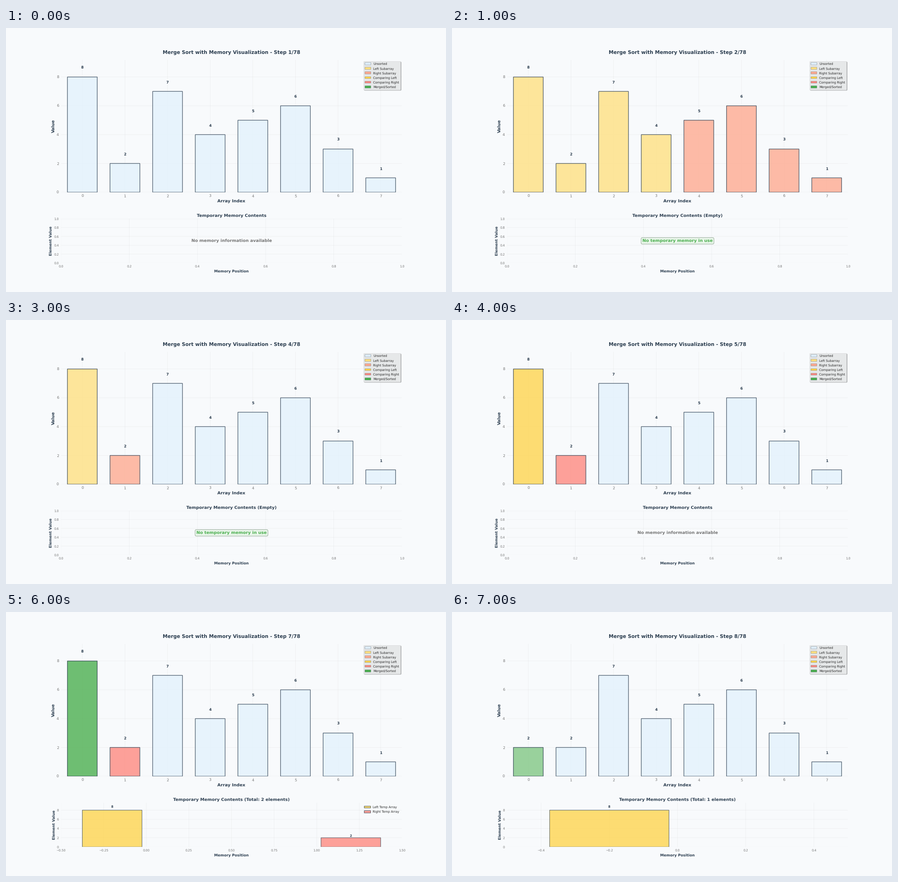
A matplotlib script for the animation above (8000 ms loop, 966 by 580 pixels).

```python
import matplotlib.pyplot as plt
from matplotlib.animation import FuncAnimation
from matplotlib.patches import Patch

DPI = 48.3
BG = "#F8FAFC"
INK = "#2C3E50"
GREY = "#757575"
GREEN = "#4CAF50"

PLAIN, LEFT, RIGHT = "#E3F2FD", "#FFE082", "#FFAB91"
CMP_LEFT, CMP_RIGHT = "#FFD54F", "#FF8A80"
PLACED = "#81C784"

KEY = [
    ("Unsorted", PLAIN),
    ("Left Subarray", LEFT),
    ("Right Subarray", RIGHT),
    ("Comparing Left", CMP_LEFT),
    ("Comparing Right", CMP_RIGHT),
    ("Merged/Sorted", GREEN),
]

START = [8, 2, 7, 4, 5, 6, 3, 1]
TOTAL_STEPS = 78

# Each step: leading bar colours, memory (None = unknown, else left and right lists)
STEPS = [
    ([], None),
    ([LEFT] * 4 + [RIGHT] * 4, ([], [])),
    ([LEFT] * 2 + [RIGHT] * 2, ([], [])),
    ([LEFT, RIGHT], ([], [])),
    ([CMP_LEFT, CMP_RIGHT], None),
    ([CMP_LEFT, CMP_RIGHT], ([8], [2])),
    ([GREEN, CMP_RIGHT], ([8], [2])),
    ([PLACED], ([8], [])),
]

plt.rcParams.update({
    "font.family": "DejaVu Sans",
    "text.hinting": "none",
    "text.color": "#262626",
    "axes.facecolor": BG,
    "axes.axisbelow": True,
})

fig, (top, low) = plt.subplots(
    2, 1, figsize=(966.001 / DPI, 580.001 / DPI), dpi=DPI, facecolor=BG,
    gridspec_kw={"height_ratios": [3, 1], "hspace": 0.3})


def style(ax, title, xlabel, ylabel, title_size, pad, label_size, tick_size):
    bold = {"fontweight": "bold", "color": INK}
    ax.set_title(title, fontsize=title_size, pad=pad, **bold)
    ax.set_xlabel(xlabel, fontsize=label_size, **bold)
    ax.set_ylabel(ylabel, fontsize=label_size, **bold)
    ax.tick_params(length=0, pad=7, labelsize=tick_size, labelcolor=GREY)
    ax.grid(True, color="0.8", linewidth=1, alpha=0.3, snap=False)
    ax.spines[:].set_visible(False)


def draw_bars(ax, xs, heights, colors, width, line, label_y, size):
    ax.bar(xs, heights, width, color=colors, edgecolor=INK,
           linewidth=line, alpha=0.8, snap=False)
    for x, h in zip(xs, heights):
        ax.text(x, label_y(h), str(h), ha="center", va="bottom",
                fontsize=size, fontweight="bold", color=INK)


def draw_array(step, colors):
    values = START[:]
    if step == len(STEPS) - 1:
        values[0] = 2
    colors = colors + [PLAIN] * (len(values) - len(colors))
    top.clear()
    draw_bars(top, range(len(values)), values, colors, 0.7, 2,
              lambda h: h + 0.5, 12)
    top.set_xlim(-0.5, len(values) - 0.5)
    top.set_ylim(0, max(START) * 1.15)
    top.set_xticks(range(len(values)))
    style(top, "Merge Sort with Memory Visualization - "
          f"Step {step + 1}/{TOTAL_STEPS}",
          "Array Index", "Value", 16, 20, 14, 12)
    handles = [Patch(facecolor=c, edgecolor=INK, linewidth=0.5, label=name)
               for name, c in KEY]
    top.legend(handles=handles, loc="upper right", fontsize=10,
               frameon=True, shadow=True, framealpha=0.8)


def draw_memory(memory):
    low.clear()
    title = "Temporary Memory Contents"
    center = dict(ha="center", va="center", fontsize=14, fontweight="bold")
    if memory is None:
        low.text(0.5, 0.5, "No memory information available",
                 color=GREY, **center)
    elif not any(memory):
        title += " (Empty)"
        box = dict(boxstyle="round,pad=0.3", facecolor="#E8F5E9",
                   edgecolor="#6F8672", linewidth=1)
        low.text(0.5, 0.5, "No temporary memory in use",
                 color=GREEN, bbox=box, **center)
    else:
        left, right = memory
        count = len(left) + len(right)
        title += f" (Total: {count} elements)"
        xs = ([i - 0.2 for i in range(len(left))]
              + [i + 0.2 for i in range(len(left), count)])
        colors = [CMP_LEFT] * len(left) + [CMP_RIGHT] * len(right)
        draw_bars(low, xs, left + right, colors, 0.35, 1.5,
                  lambda h: h * 1.05, 10)
        low.set_xlim(-0.5, count - 0.5)
        low.set_ylim(0, max(left + right) * 1.2)
        if left and right:
            handles = [Patch(facecolor=c, edgecolor=INK, linewidth=1.5,
                             alpha=0.8, label=f"{side} Temp Array")
                       for side, c in (("Left", CMP_LEFT),
                                       ("Right", CMP_RIGHT))]
            low.legend(handles=handles, loc="upper right", fontsize=10,
                       frameon=False)
    style(low, title, "Memory Position", "Element Value", 14, 6, 12, 10)


def update(step):
    colors, memory = STEPS[step]
    draw_array(step, colors)
    draw_memory(memory)
    return []


anim = FuncAnimation(fig, update, frames=len(STEPS), interval=1000,
                     init_func=lambda: update(0), repeat=True, blit=False)
plt.show()
```
